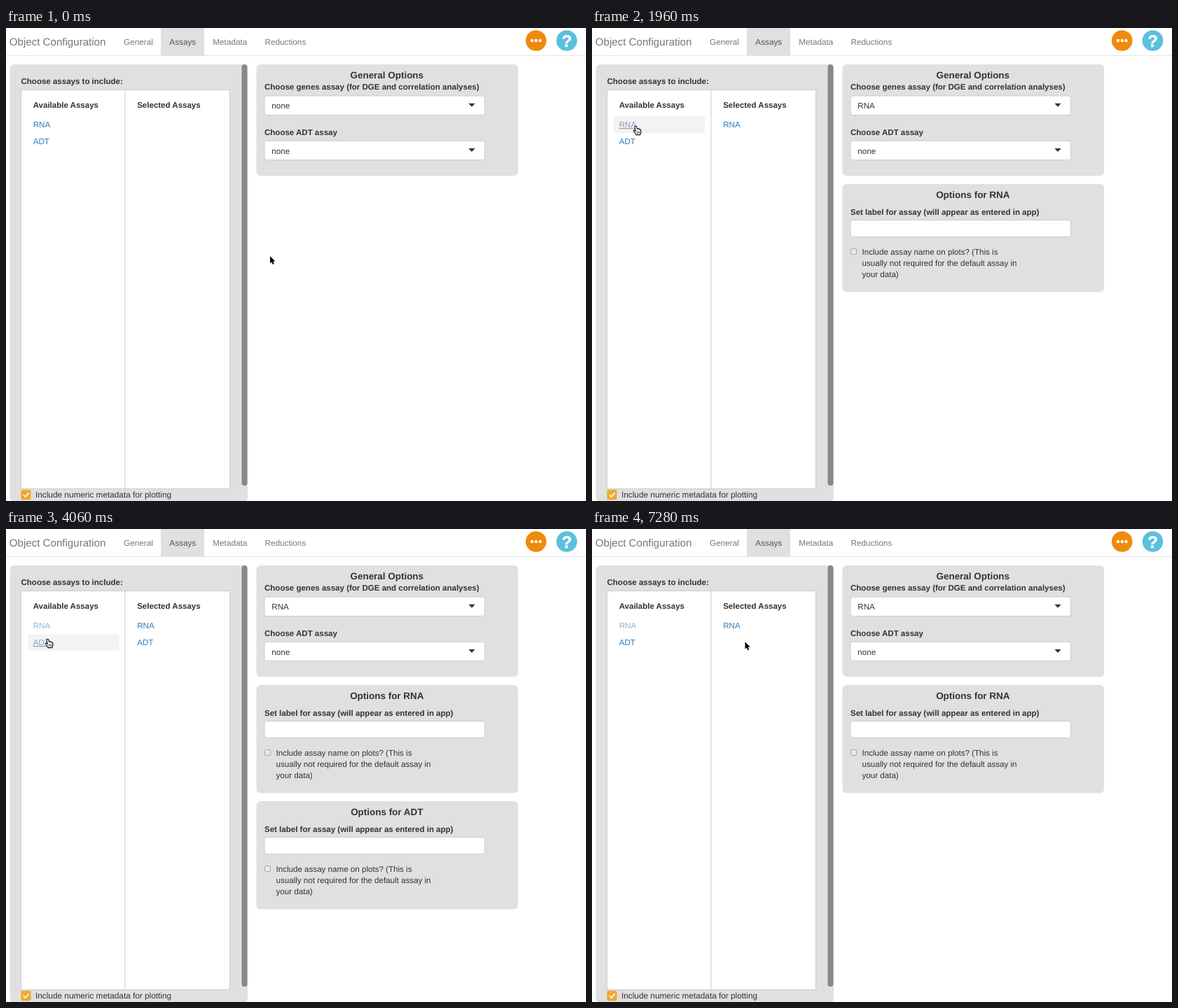
Animation, 828 px wide and 676 px high, one loop 8000 ms. Source, as an HTML page:

```html
<!DOCTYPE html>
<html lang="en">
<head>
<meta charset="utf-8">
<title>Object Configuration</title>
<style>
  html, body { margin: 0; width: 100%; height: 100%; overflow: hidden; background: #fff; }
  svg { display: block; }
  text { font: 11.6px "Liberation Sans", Arial, sans-serif; fill: #333; text-rendering: geometricPrecision; }
  text.bold { font-weight: bold; font-size: 11.53px; }
  text.head { font-weight: bold; font-size: 13.45px; text-anchor: middle; }
  text.nav { font-size: 11.75px; fill: #777; }
  text.brand { font-size: 15.1px; fill: #777; }
  .panel { fill: #e0e0e0; }
  .field { fill: #fff; stroke: #ccc; }
  .item text { fill: #337ab7; }
  .item rect { fill: none; }
  .item.hover rect { fill: #ebebeb; }
  .item.hover text { fill: #23527c; text-decoration: underline; }
  .item.used { opacity: .55; }
  .hidden { display: none; }
</style>
</head>
<body>
<svg width="828" height="676" viewBox="0 0 828 676">
  <defs>
    <g id="select">
      <rect class="field" x="369" y="97" width="314.5" height="27.5" rx="3.5"/>
      <path d="M660.3 107.8h9.4l-4.7 4.9z" fill="#333"/>
    </g>
    <g id="options">
      <rect class="panel" x="357.5" y="223" width="373.5" height="154.5" rx="6"/>
      <text class="bold" x="369" y="266.5">Set label for assay (will appear as entered in app)</text>
      <rect class="field" x="369" y="274.5" width="314.5" height="24" rx="3.5"/>
      <rect x="369.5" y="315.5" width="8" height="8" rx="1.8" fill="#e9e9e9" stroke="#a3a3a3"/>
      <text x="385.5" y="324">Include assay name on plots? (This is</text>
      <text x="385.5" y="340">usually not required for the default assay in</text>
      <text x="385.5" y="356">your data)</text>
    </g>
  </defs>

  <!-- Navigation bar -->
  <rect y="39" width="828" height="1" fill="#e4e4e4"/>
  <rect class="panel" x="221" width="62" height="39.5"/>
  <text class="brand" x="4.8" y="24.5">Object Configuration</text>
  <text class="nav" x="168" y="23.7">General</text>
  <text class="nav" x="233.3" y="23.7" style="fill:#555">Assays</text>
  <text class="nav" x="295.3" y="23.7">Metadata</text>
  <text class="nav" x="369.5" y="23.7">Reductions</text>
  <circle cx="756.7" cy="18" r="14.8" fill="#ee8b0c"/>
  <g fill="#fff">
    <circle cx="750.9" cy="18" r="2.2"/><circle cx="756.7" cy="18" r="2.2"/><circle cx="762.5" cy="18" r="2.2"/>
  </g>
  <circle cx="800.5" cy="18" r="14.8" fill="#5bc0de"/>
  <text x="800.5" y="26.7" style="font-size:24px;font-weight:bold;fill:#fff;text-anchor:middle;stroke:#fff;stroke-width:.5">?</text>

  <!-- Assay picker -->
  <rect class="panel" x="5.5" y="52" width="339.5" height="625" rx="6"/>
  <rect x="336.5" y="52" width="8" height="602" rx="4" fill="#888"/>
  <text class="bold" x="21.5" y="80">Choose assays to include:</text>
  <rect class="field" x="21.5" y="88.5" width="298" height="570"/>
  <path d="M170 89V658" stroke="#ccc"/>
  <text class="bold" x="38.7" y="114">Available Assays</text>
  <text class="bold" x="187.2" y="114">Selected Assays</text>
  <g class="item" id="a0"><rect x="31" y="126" width="130.5" height="24.3"/><text x="38.7" y="142">RNA</text></g>
  <g class="item" id="a1"><rect x="31" y="150.3" width="130.5" height="24"/><text x="38.7" y="166">ADT</text></g>
  <g class="item" id="s0"><rect x="179" y="126" width="132" height="24.3"/><text x="187.2" y="142">RNA</text></g>
  <g class="item" id="s1"><rect x="179" y="150.3" width="132" height="24"/><text x="187.2" y="166">ADT</text></g>
  <rect x="21.5" y="660" width="14" height="14.2" rx="2" fill="#f0a830"/>
  <path d="M24.8 667.2l2.7 2.8 5-5.6" fill="none" stroke="#fff" stroke-width="1.6"/>
  <text x="42" y="671" style="font-size:11.8px">Include numeric metadata for plotting</text>

  <!-- Option panels -->
  <rect class="panel" x="357.5" y="52" width="373.5" height="159.3" rx="6"/>
  <text class="head" x="543.8" y="71.7">General Options</text>
  <text class="bold" x="369" y="88.3">Choose genes assay (for DGE and correlation analyses)</text>
  <use href="#select"/>
  <text id="genes" x="379.3" y="115">none</text>
  <text class="bold" x="369" y="153.3">Choose ADT assay</text>
  <use href="#select" y="64.2"/>
  <text x="379.3" y="179.5">none</text>
  <g id="rnaOptions"><use href="#options"/><text class="head" x="543.8" y="243">Options for RNA</text></g>
  <g id="adtOptions"><use href="#options" y="166"/><text class="head" x="543.8" y="409">Options for ADT</text></g>

  <!-- Pointer -->
  <g id="pointer">
    <circle id="ring" r="22" fill="none" stroke="#222" stroke-width="1.6"/>
    <path id="arrow" d="M0 0V10.3L2.3 8.2 3.9 11.9 5.8 11.1 4.2 7.5H7.3Z" stroke="#fff" stroke-width="1.4" paint-order="stroke"/>
    <g id="hand" stroke="#000" stroke-linejoin="round" stroke-linecap="round">
      <path d="M-2 1.3C-1.9-.2.3-.2.7 1.2L1.4 4.2C1.8 3.4 3.2 3.5 3.4 4.6 3.9 3.8 5.1 4.1 5.3 5.2 6 4.8 6.9 5.2 6.9 6.2V8.6C6.9 10.2 6 10.9 5.9 12.6H0C-.4 11-2.2 9.6-3.5 7.7-4.4 6.3-2.9 5.5-1.8 6.6L-.8 7.6Z" fill="#fff" stroke-width="1.05"/>
      <path d="M1.4 8v2.5M3.2 8v2.5M5 8v2.5" stroke-width=".7"/>
    </g>
  </g>
</svg>
<script>
const LOOP = 8000, TICK = 70;
const $ = id => document.getElementById(id);
const show = (id, on) => $(id).classList.toggle('hidden', !on);

// Pointer moves: first tick, number of ticks, end point, sideways bow
const moves = [
  { at: 420, ticks: 11, x: 66, y: 136, bow: 0 },
  { at: 1260, ticks: 3, x: 62, y: 143, bow: 0 },
  { at: 1610, ticks: 2, x: 63, y: 140, bow: 0 },
  { at: 2310, ticks: 4, x: 61, y: 157, bow: 0 },
  { at: 2940, ticks: 1, x: 60, y: 157, bow: 0 },
  { at: 5250, ticks: 12, x: 217, y: 163, bow: 5 },
  { at: 6090, ticks: 2, x: 218.5, y: 161.3, bow: 0 }
];
const clicks = [[1750, 1890], [3850, 3990], [7140, 7210]];
const ease = p => p * p * (3 - 2 * p);

function pointerAt(t) {
  let x = 377, y = 326;
  for (const m of moves) {
    if (t < m.at) break;
    const p = ease(Math.min(1, ((t - m.at) / TICK + 1) / m.ticks));
    x += (m.x - x) * p;
    y += (m.y - y) * p + m.bow * Math.sin(Math.PI * p);
  }
  return { x, y };
}

function hoveredItem(t, { x, y }, present) {
  if (t < 1610 || y < 126 || y > 174) return null;
  const column = x > 31 && x < 161 ? 'a' : x > 179 && x < 311 ? 's' : null;
  const id = column && column + (y < 150 ? 0 : 1);
  return id && present[id] ? id : null;
}

function draw(now) {
  const t = Math.floor((now % LOOP) / TICK + 1e-6) * TICK;
  const rna = t >= 1960, adt = t >= 3990 && t < 7210;
  const present = { a0: true, a1: true, s0: rna, s1: adt };
  const pos = pointerAt(t);
  const hovered = hoveredItem(t, pos, present);

  for (const id in present) {
    show(id, present[id]);
    $(id).classList.toggle('hover', id === hovered);
  }
  $('a0').classList.toggle('used', rna);
  $('a1').classList.toggle('used', adt);
  $('genes').textContent = rna ? 'RNA' : 'none';
  show('rnaOptions', rna);
  show('adtOptions', t >= 4060 && t < 7280);

  $('pointer').setAttribute('transform', `translate(${pos.x} ${pos.y})`);
  show('hand', hovered);
  show('arrow', !hovered);
  show('ring', clicks.some(([from, to]) => t >= from && t < to));
}

const start = performance.now();
function frame() {
  draw(performance.now() - start);
  requestAnimationFrame(frame);
}
frame();
</script>
</body>
</html>
```
